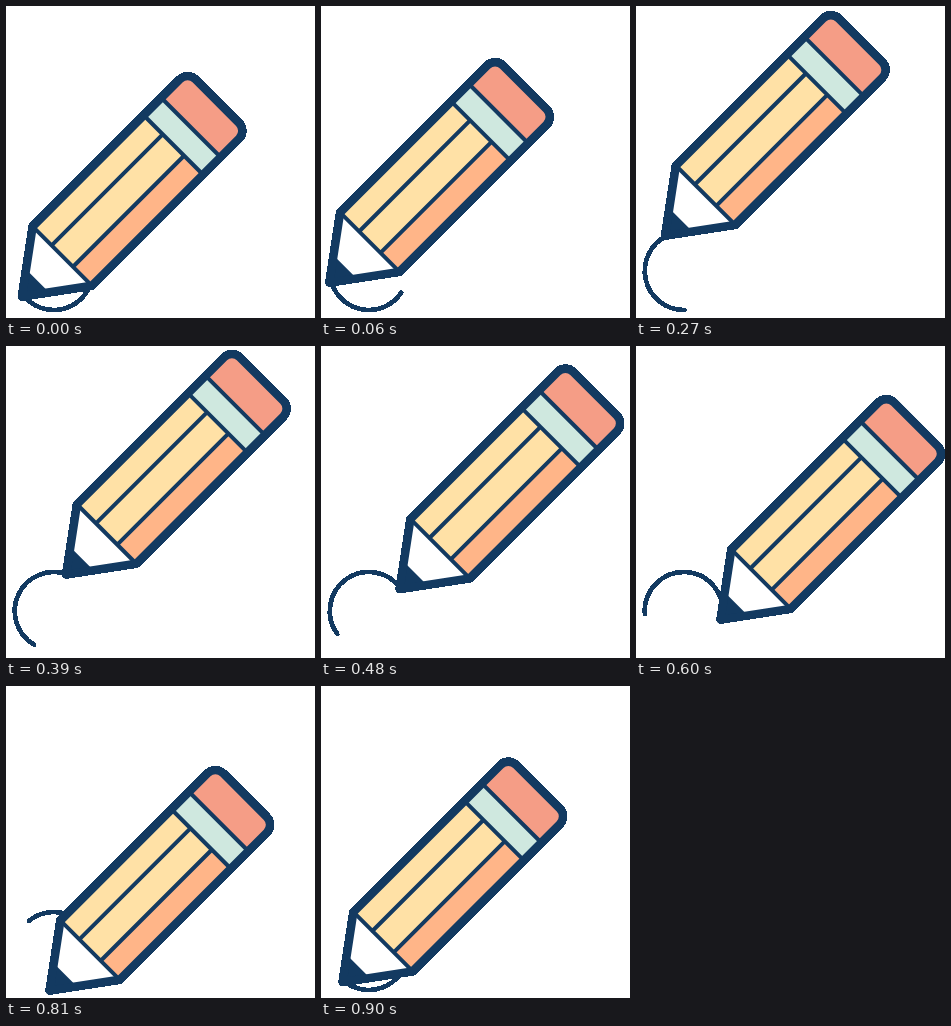
Write an HTML page that moves like this. It is 309x312 px and loops after 0.93 s.

```html
<!DOCTYPE html>
<html lang="en">
<head>
<meta charset="utf-8">
<title>Pencil drawing a circle</title>
<style>
  html, body { margin: 0; width: 100%; height: 100%; overflow: hidden; background: #fff; }
  svg { display: block; width: 100vw; height: 100vh; }
  .ink { fill: none; stroke: #133a61; stroke-linecap: round; stroke-linejoin: round; }
  .hard { shape-rendering: crispEdges; }
</style>
</head>
<body>
<svg viewBox="0 0 309 312">
  <defs>
    <path id="shape" d="M2 0 59 -41.8H267A11 11 0 0 1 278 -30.8V30.8A11 11 0 0 1 267 41.8H59Z"/>
  </defs>
  <path id="trail" class="ink hard" stroke-width="4.7"/>
  <g id="pencil">
    <!-- local x runs from the tip to the eraser -->
    <g transform="rotate(-45)">
      <use href="#shape" class="ink hard" stroke-width="9"/>
      <path d="M2 0 59 -41.8V41.8Z" fill="#fff"/>
      <path d="M2 0 24 -16.1V16.1Z" fill="#133a61"/>
      <path d="M59 -41H216V15H59Z" fill="#ffe1a6"/>
      <path d="M59 15H216V41H59Z" fill="#ffb588"/>
      <path d="M216 -41H241V41H216Z" fill="#cfe8df"/>
      <path d="M241 -41H267A11 11 0 0 1 278 -30V30A11 11 0 0 1 267 41H241Z" fill="#f59d86"/>
      <path class="ink" stroke-width="4" d="M59 -41V41M216.1 -41V41M240.9 -41V41M59 -15.1H216M59 15.1H216"/>
      <use href="#shape" class="ink" stroke-width="8.2"/>
    </g>
  </g>
</svg>
<script>
  const LOOP = 930, STEP = 30, R = 39;
  const trail = document.getElementById('trail');
  const pencil = document.getElementById('pencil');

  function onCircle(cx, cy, r, deg) {
    const a = deg * Math.PI / 180;
    return [cx + r * Math.cos(a), cy + r * Math.sin(a)].map(n => n.toFixed(2));
  }

  function draw(t) {
    const head = 140 + 360 * t / LOOP;
    const tail = 18 + 0.2625 * t;
    const from = onCircle(47.8, 265, R, tail);
    const to = onCircle(47.8, 265, R, head);
    const large = head - tail > 180 ? 1 : 0;
    trail.setAttribute('d', `M${from}A${R} ${R} 0 ${large} 1 ${to}`);
    pencil.setAttribute('transform', `translate(${onCircle(44.8, 266.5, 39.4, head)})`);
  }

  const start = performance.now();
  function tick() {
    const t = (performance.now() - start) % LOOP;
    draw(Math.floor(t / STEP) * STEP);
    requestAnimationFrame(tick);
  }
  tick();
</script>
</body>
</html>
```
